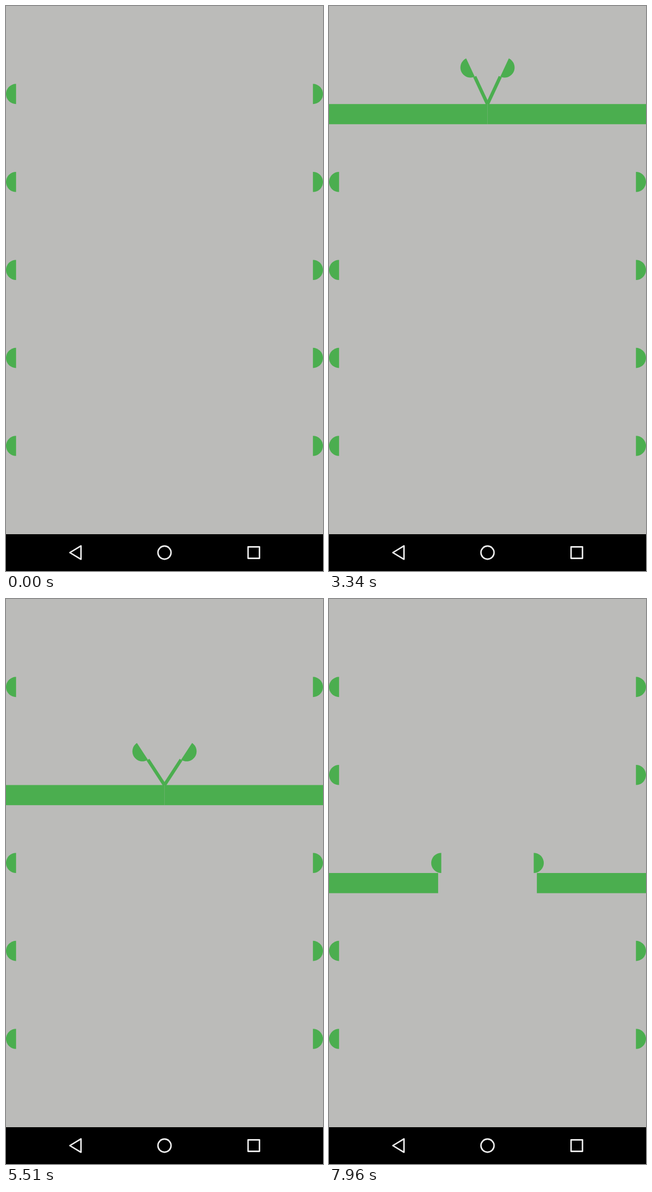
Write an HTML page with a canvas that moves like this. It is 561 px wide and 998 px high and loops after 8 s.

```html
<!DOCTYPE html>
<html>
<head>
<meta charset="utf-8">
<style>
html, body { margin: 0; width: 561px; height: 998px; overflow: hidden; background: #bbbbb9; }
canvas { display: block; }
</style>
</head>
<body>
<canvas id="stage" width="561" height="998"></canvas>
<script>
const ctx = document.getElementById('stage').getContext('2d');
const W = 561, H = 998, MID = W / 2, R = 17.8, STEM = 3 * R, GAP = 155.4, LOOP = 8000;

// Per row: start of slide in, rise, open, close, sink, slide out, and the end.
const rows = [
  [1475, 1754, 2165, 2865, 3525, 3875, 4225],
  [4640, 4990, 5377, 6077, 6787, 7130, 7420],
  [7720, 8070, 8420, 9120, 9820, 10170, 10520],
  null,
  null
];

function bounce(t) {
  const x = 1.1226 * t;
  if (x < 0.3535) return 8 * x * x;
  if (x < 0.7408) return 8 * (x - 0.54719) ** 2 + 0.7;
  if (x < 0.9644) return 8 * (x - 0.8526) ** 2 + 0.9;
  return 8 * (x - 1.0435) ** 2 + 0.95;
}

function pose(keys, t) {
  if (!keys) return { slide: 0, rise: 0, angle: 0 };
  const part = i => Math.min(1, Math.max(0, (t - keys[i]) / (keys[i + 1] - keys[i])));
  return {
    slide: part(0) - part(5),
    rise: STEM * (part(1) - part(4)),
    angle: Math.PI / 2 * (part(3) > 0 ? 1 - part(3) : bounce(part(2)))
  };
}

function drawSide(y, { slide, rise, angle }) {
  ctx.fillRect(0, y + R, MID * slide, 2 * R);
  ctx.save();
  ctx.translate(R + (MID - R) * slide, y + R);
  ctx.rotate(-angle);
  ctx.beginPath();
  ctx.arc(0, -R - rise, R, Math.PI / 2, Math.PI * 1.5);
  ctx.fill();
  if (rise > 0) ctx.fillRect(-3, -rise, 6, rise);
  ctx.restore();
}

function drawNav() {
  ctx.fillStyle = '#000';
  ctx.fillRect(0, 933, W, H - 933);
  ctx.strokeStyle = '#eee';
  ctx.lineWidth = 2.6;
  ctx.lineJoin = 'round';
  ctx.beginPath();
  ctx.moveTo(113, 965.5);
  ctx.lineTo(132.7, 953.7);
  ctx.lineTo(132.7, 977.3);
  ctx.closePath();
  ctx.moveTo(MID + 11.6, 965.5);
  ctx.arc(MID, 965.5, 11.6, 0, 2 * Math.PI);
  ctx.rect(428.4, 955.4, 20.2, 20.2);
  ctx.stroke();
}

function draw(now) {
  const t = now % LOOP;
  ctx.fillStyle = '#bbbbb9';
  ctx.fillRect(0, 0, W, H);
  ctx.fillStyle = '#4bae4f';
  rows.forEach((keys, i) => {
    const y = GAP * (i + 1), p = pose(keys, t);
    drawSide(y, p);
    ctx.save();
    ctx.translate(W, 0);
    ctx.scale(-1, 1);
    drawSide(y, p);
    ctx.restore();
  });
  drawNav();
}

function tick() {
  draw(performance.now());
  requestAnimationFrame(tick);
}
tick();
</script>
</body>
</html>
```
